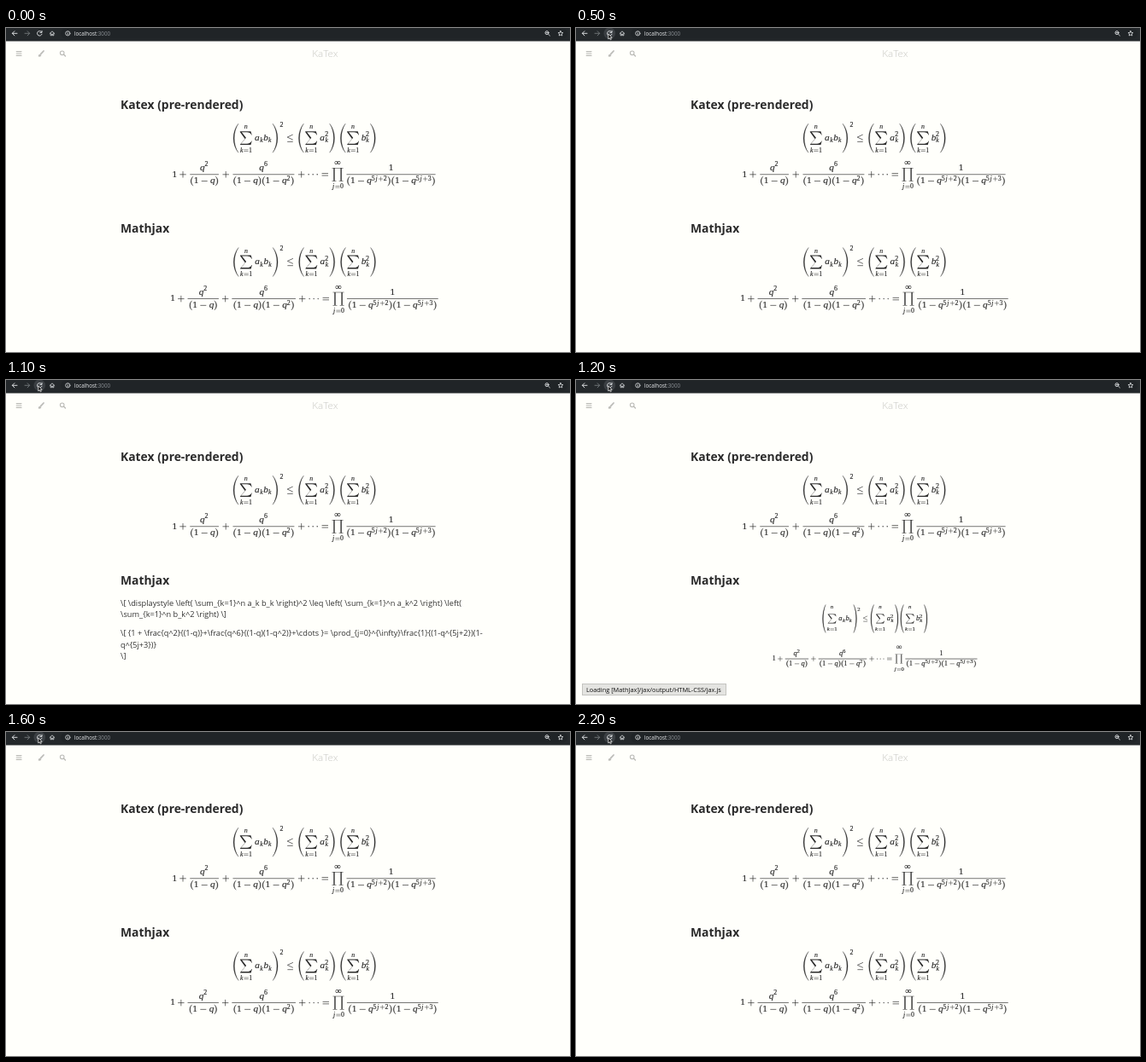
An HTML page that plays this animation: 660x380 px, repeating every 2.3 s.

```html
<!DOCTYPE html>
<html lang="en">
<head>
<meta charset="utf-8">
<title>Math rendering on reload</title>
<style>
html, body { margin: 0; width: 100%; height: 100%; overflow: hidden; background: #fffffb; }
svg { display: block; width: 660px; height: 380px; font-family: "Open Sans", "Noto Sans", sans-serif; }
.math { font-family: "Liberation Serif", "Noto Serif", serif; text-anchor: middle; fill: #2b2b2b; }
.math text { stroke: #2b2b2b; stroke-width: .15px; }
.line { fill: none; stroke-linecap: round; stroke-linejoin: round; }
.heading { font-size: 13.88px; font-weight: 700; fill: #2b2b2b; }
.raw { font-size: 9.22px; fill: #333; }
.status { font-size: 7.37px; fill: #111; }
</style>
</head>
<body>
<svg viewBox="0 0 660 380">
  <rect width="660" height="380" fill="#fffffb"/>
  <rect width="660" height="15.5" fill="#24282b"/>
  <rect x="64" y="0.5" width="593" height="12" rx="6" fill="#202427"/>
  <circle id="hover" cx="39.3" cy="6.3" r="6.8" fill="#3b3f43"/>

  <g class="line" stroke="#e0e2e5" stroke-width=".95">
    <path d="M13 6.3H7.4M9.9 3.7L7.3 6.3L9.9 8.9"/>
    <path d="M22 6.3H27.6M25.1 3.7L27.7 6.3L25.1 8.9" stroke="#6f7478"/>
    <path d="M41.5 4.5A2.8 2.8 0 1 0 42 7.2M42 3.3V5.4H39.8"/>
    <path d="M51.2 6.5L54 3.8L56.8 6.5M52.2 6V8.8H53.4V7.2H54.6V8.8H55.8V6" stroke-width=".8"/>
    <circle cx="72.3" cy="6.3" r="2.6" stroke-width=".8"/>
    <path d="M72.3 6.2V7.6M72.3 4.9V5" stroke-width=".8"/>
    <circle cx="633" cy="5.6" r="2" stroke-width=".9"/>
    <path d="M634.6 7.2L636.4 9M632.2 5.6H633.8" stroke-width=".9"/>
    <path id="star" stroke-width=".8"/>
  </g>
  <text x="80" y="8.6" font-size="6.24" fill="#e8eaed">localhost<tspan fill="#8d9297">:3000</tspan></text>

  <g class="line" stroke="#bcbcb8" stroke-width="1.1">
    <path d="M12.2 27.6H18M12.2 30H18M12.2 32.4H18"/>
    <path d="M44 27L40.6 30.6" stroke-width="1.8"/>
    <path d="M39.8 31.2Q38.4 31.2 38.3 33Q40.4 33.4 40.8 32" fill="#bcbcb8"/>
    <circle cx="65.7" cy="29.3" r="2.3"/>
    <path d="M67.5 31.1L69.5 33.1" stroke-width="1.4"/>
  </g>
  <text x="373.4" y="34" font-size="11.7" font-weight="300" text-anchor="middle" fill="#c8c8c4">KaTex</text>

  <text class="heading" x="134" y="94.5">Katex (pre-rendered)</text>
  <text class="heading" x="134" y="239.5">Mathjax</text>

  <g id="katex" class="math"></g>
  <g id="mathjax" class="math"></g>
  <g id="preview" class="math"></g>
  <g id="raw" class="raw"></g>
  <g id="status">
    <rect id="statusBox" x="7.5" y="356.5" height="13" fill="#e4e4e1" stroke="#c4c4c0"/>
    <text id="statusText" class="status" x="12" y="365.8"></text>
  </g>
  <path id="cursor" d="M0 0V6.2L1.5 4.9L2.5 7L3.5 6.5L2.6 4.5H4.4Z" fill="#111" stroke="#fff" stroke-width=".7"/>
</svg>
<script>
const $ = id => document.getElementById(id);

// Advance widths in em; digits default to .5
const WIDTH = { a: .529, b: .429, k: .552, q: .482, j: .469, n: .6, '(': .389, ')': .389,
  '+': .778, '-': .778, '=': .778, '≤': .778, '⋯': 1.168, '∞': 1 };
const SPACE = { '+': .222, '-': .222, '=': .278, '≤': .278 };
const STROKES = {
  '+': 'M.06-.25H.72M.39-.58V.08',
  '-': 'M.08-.25H.7',
  '=': 'M.06-.36H.72M.06-.14H.72',
  '≤': 'M.68-.62L.1-.35L.68-.08M.1.12H.68'
};
const SUM = 'M-.61-.7H.51L.62-.33H.58Q.45-.62 .1-.62H-.43L.02-.04L-.5.58H.1Q.45.58 .58.3H.62L.51.7H-.61V.66L-.1.06L-.61-.64Z';
const PROD = 'M-.58-.7H.58V-.65H.42V.65H.58V.7H.14V.65H.3V-.65H-.3V.65H-.14V.7H-.58V.65H-.42V-.65H-.58Z';

function typesetter(style) {
  const { em, script: scriptScale } = style;
  let svg = '';

  const shape = (d, x, y, s, attrs = '') =>
    svg += `<path d="${d}" transform="translate(${x} ${y}) scale(${s})" ${attrs}/>`;

  // inset: empty share of the width on the convex side
  function paren(ch, x, axis, w, h, thick, inset) {
    const left = ch === '(';
    const at = share => x + w * (left ? share : 1 - share);
    const tip = at(inset + .65), belly = at(inset);
    const outer = tip + (belly - tip) / .75, inner = outer + (left ? thick : -thick) / .75;
    const y1 = axis - h / 2, y2 = axis + h / 2, c1 = y1 + h * .27, c2 = y2 - h * .27;
    svg += `<path d="M${tip} ${y1}C${outer} ${c1} ${outer} ${c2} ${tip} ${y2}C${inner} ${c2} ${inner} ${c1} ${tip} ${y1}Z" stroke="#2b2b2b" stroke-width=".3"/>`;
  }

  function glyph(ch, x, y, s) {
    const w = (WIDTH[ch] || .5) * s;
    if (STROKES[ch]) shape(STROKES[ch], x, y, s, 'fill="none" stroke="#2b2b2b" stroke-width=".06"');
    else if (ch === '(' || ch === ')') paren(ch, x, y - .25 * s, w, s, .07 * s, .22);
    else if (ch === '⋯') {
      for (let i = 0; i < 3; i++)
        svg += `<circle cx="${x + (.14 + .445 * i) * s}" cy="${y - .25 * s}" r="${.06 * s}"/>`;
    } else {
      const italic = /[a-z]/.test(ch) ? ' font-style="italic"' : '';
      svg += `<text x="${x + w / 2}" y="${y}" font-size="${ch === '∞' ? s * 1.35 : s}"${italic}>${ch}</text>`;
    }
    return x + w;
  }

  // Sets a row with ^ and _ scripts and returns its right end
  function row(source, x, y, s = em, rise = .413, tight = false) {
    let subStart = null;
    for (const [token, kind, script] of source.matchAll(/([\^_])(\{[^}]*\}|.)|./gu)) {
      if (kind) {
        const start = subStart ?? x;
        const dy = kind === '^' ? -rise : .2;
        const end = row(script.replace(/[{}]/g, ''), start, y + dy * s, s * scriptScale, rise, true) + .05 * s;
        x = Math.max(x, end);
        subStart = kind === '_' ? start : null;
      } else {
        const gap = tight ? 0 : (SPACE[token] || 0) * s;
        x = glyph(token, x + gap, y, s) + gap;
        subStart = null;
      }
    }
    return x;
  }

  function measure(draw) {
    const saved = svg, end = draw();
    svg = saved;
    return end;
  }

  const centred = (source, x, ...rest) =>
    row(source, x - measure(() => row(source, 0, ...rest)) / 2, ...rest);

  function operator(d, w, x, axis, top, bottom, topShift) {
    const mid = x + w * em / 2;
    shape(d, mid, axis, em * style.opScale);
    centred(top, mid, axis + topShift, em * scriptScale, .4, true);
    centred(bottom, mid, axis + style.lower, em * scriptScale, .4, true);
    return x + (w + .167) * em;
  }

  function fraction(num, den, x, axis) {
    const base = axis + .25 * em, pad = style.barPad * em;
    const start = x + style.outer * em;
    const end = row(den, start + pad, base + .686 * em, em, .3) + pad;
    centred(num, (start + end) / 2, base - .677 * em, em);
    svg += `<rect x="${start}" y="${axis - .3}" width="${end - start}" height=".65"/>`;
    return end + style.outer * em;
  }

  function group(body, x, axis) {
    const w = style.paren * em;
    const big = (ch, at) => {
      paren(ch, at, axis, w, style.parenHeight, .095 * em, style.inset);
      return at + w;
    };
    x = big('(', x);
    x = operator(SUM, 1.444, x, axis, 'n', 'k=1', style.upper);
    return big(')', row(body, x, axis + .25 * em));
  }

  function inequality(x, axis) {
    x = group('a_kb_k', x, axis);
    x = row('2', x, axis + style.power, em * scriptScale) + .05 * em;
    x = row('≤', x, axis + .25 * em);
    x = group('a_k^2', x, axis) + .167 * em;
    return group('b_k^2', x, axis);
  }

  function identity(x, axis) {
    const base = axis + .25 * em;
    x = row('1+', x, base);
    x = fraction('q^2', '(1-q)', x, axis);
    x = row('+', x, base);
    x = fraction('q^6', '(1-q)(1-q^2)', x, axis);
    x = row('+⋯=', x, base);
    x = operator(PROD, 1.278, x, axis, '∞', 'j=0', style.upper + .5);
    return fraction('1', '(1-q^{5j+2})(1-q^{5j+3})', x, axis);
  }

  return (mid, axis1, axis2) => {
    inequality(mid - measure(() => inequality(0, axis1)) / 2, axis1);
    identity(mid - measure(() => identity(0, axis2)) / 2, axis2);
    return svg;
  };
}

const full = { em: 11.3, script: .7, paren: .792, inset: .28, parenHeight: 34, opScale: 1,
  barPad: 0, outer: .12, upper: -11, lower: 16.4, power: -13.3 };
const wide = { ...full, barPad: .12, outer: .07 };
const small = { ...wide, em: 8.5, script: .8, paren: .65, inset: .12, parenHeight: 33, opScale: .94,
  upper: -11.7, lower: 14.2, power: -9.5 };

$('katex').innerHTML = typesetter(full)(349.2, 129.2, 171.8);
$('mathjax').innerHTML = typesetter(wide)(349.4, 274.5, 317.6);
$('preview').innerHTML = typesetter(small)(349.8, 280, 327);

const rawLines = [
  [265, '\\[ \\displaystyle \\left( \\sum_{k=1}^n a_k b_k \\right)^2 \\leq \\left( \\sum_{k=1}^n a_k^2 \\right) \\left('],
  [277.7, '\\sum_{k=1}^n b_k^2 \\right) \\]'],
  [300.3, '\\[ {1 + \\frac{q^2}{(1-q)}+\\frac{q^6}{(1-q)(1-q^2)}+\\cdots }= \\prod_{j=0}^{\\infty}\\frac{1}{(1-q^{5j+2})(1-'],
  [313.7, 'q^{5j+3})}'],
  [327, '\\]']
];
$('raw').innerHTML = rawLines.map(([y, line]) => `<text x="134" y="${y}">${line}</text>`).join('');

const starPoints = Array.from({ length: 10 }, (_, i) => {
  const r = i % 2 ? 1.4 : 3.1, angle = i * Math.PI / 5;
  return `${649 + r * Math.sin(angle)} ${6.5 - r * Math.cos(angle)}`;
});
$('star').setAttribute('d', `M${starPoints.join('L')}Z`);

const LOOP = 2300, STEP = 100;
const show = (id, on) => $(id).setAttribute('visibility', on ? 'visible' : 'hidden');

function render(time) {
  const t = Math.floor(time % LOOP / STEP) * STEP;
  const isRaw = t >= 1000 && t < 1200;
  const isPreview = t >= 1200 && t < 1400;
  show('raw', isRaw);
  show('preview', isPreview);
  show('mathjax', !isRaw && !isPreview);

  show('status', t >= 1200 && t < 1500);
  $('statusText').textContent = t < 1400 ? 'Loading [MathJax]/jax/output/HTML-CSS/jax.js' : 'Typesetting math: 100%';
  $('statusBox').setAttribute('width', t < 1400 ? 168 : 94);

  const p = Math.min(1, Math.max(0, (t - 200) / 300));
  const rest = (1 - p) ** 2;
  $('cursor').setAttribute('transform', `translate(${37.8 - 8 * rest} ${6.8 - 17 * rest})`);
  show('cursor', t > 200);
  show('hover', t >= 400);
}

const began = performance.now();
(function tick() {
  render(performance.now() - began);
  requestAnimationFrame(tick);
})();
</script>
</body>
</html>
```
